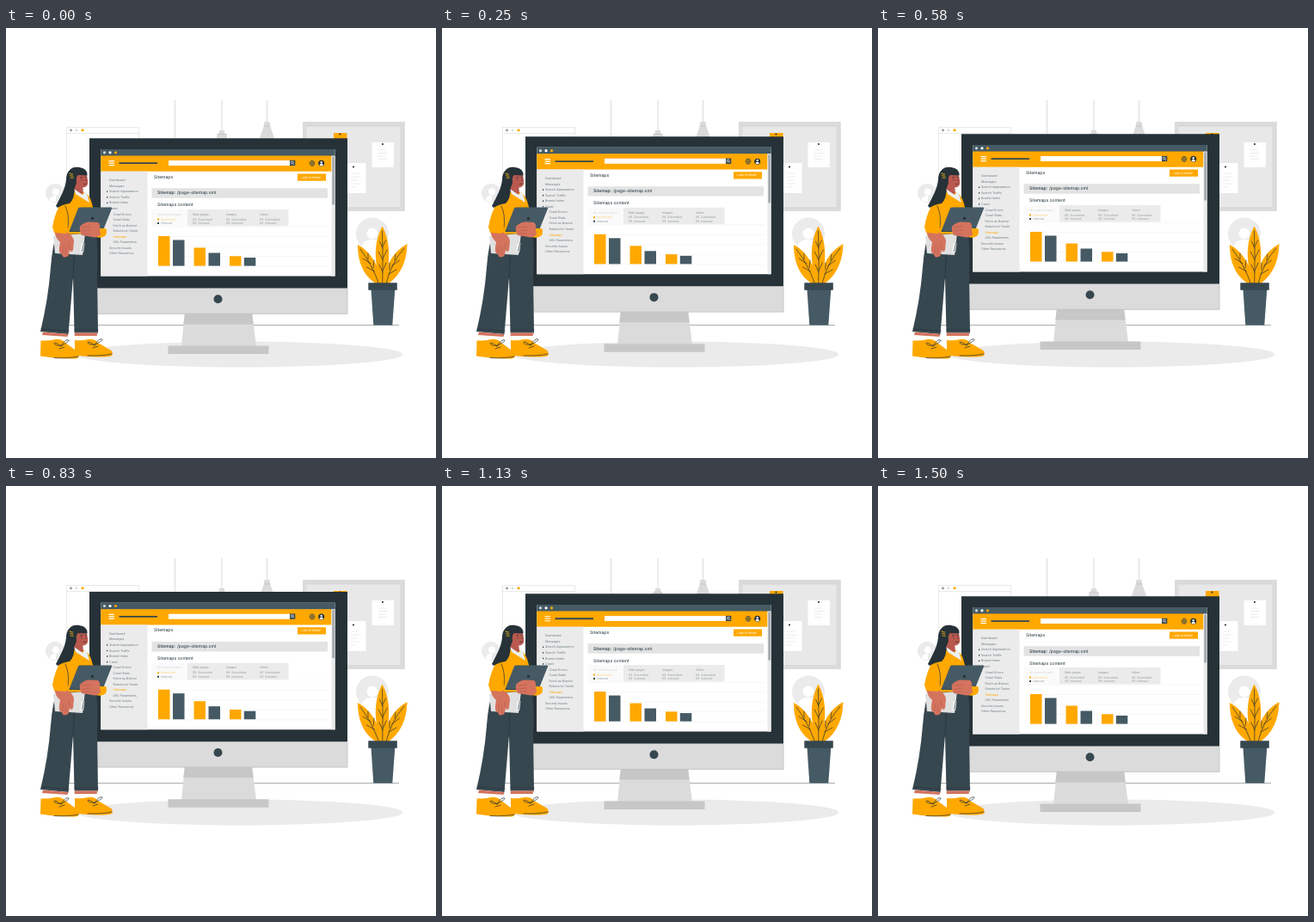
These frames come from a looping animation (500x500 px, 1.54 s). An HTML page:

```html
<!DOCTYPE html>
<html lang="en">
<head>
<meta charset="utf-8">
<title>Sitemap workspace</title>
<style>
html, body { margin: 0; width: 100%; height: 100%; overflow: hidden; background: #fff; }
svg { display: block; width: 100vw; height: 100vh; }
text { font-family: Inter, sans-serif; text-rendering: geometricPrecision; white-space: pre; }
.vein { fill: none; stroke: #263238; stroke-width: .7; stroke-linecap: round; }
.finger { fill: none; stroke: #a64f44; stroke-width: .4; }
.skin { fill: #d4735e; }
.face { fill: #b9594f; }
.amber { fill: #ffa800; }
.dark { fill: #263238; }
.slate { fill: #455a64; }
.deep { fill: #37474f; }
</style>
</head>
<body>
<svg viewBox="0 0 500 500">
  <g id="wall">
    <path d="M196.500 84V135M251 84V120M303.500 84V110" stroke="#dbdbdb" fill="none"/>
    <g fill="#dbdbdb">
      <path d="M248 119h6v3l3 2v14h-12v-14l3-2z"/>
      <path d="M300.500 109h6l1 6 5 14v8h-18v-8l5-14z"/>
    </g>
    <path d="M246 123.500h10M300 114h7" stroke="#c7c7c7" fill="none"/>
    <path d="M345 109h118.500v104H345z" fill="#dbdbdb"/>
    <path d="M349.500 114h109v94h-109z" fill="#e8e8e8"/>
    <path d="M349.500 114h109M463 109v104" stroke="#cfcfcf" stroke-width=".7"/>
    <path class="amber" d="M381 122h15.500v20H381z"/>
    <path d="M425.500 133h25.500v29h-25.500zM392 157h26.500v35H392z" fill="#fff"/>
    <g class="dark"><circle cx="388.500" cy="123.500" r="1.100"/><circle cx="438" cy="135" r="1.100"/><circle cx="404" cy="161.500" r="1.100"/></g>
    <path d="M433 142h9M433 145.500h11M433 149h8M433 152.500h10M401 169h9M401 173h11M401 177h8M401 181h10M401 185h6" stroke="#e8e8e8" stroke-width=".8"/>
    <path d="M70.500 115.500H154.500V220H70.500zM70.500 122.500H154.500" fill="#fff" stroke="#e0e0e0" stroke-width=".7"/>
    <circle cx="75.500" cy="118.800" r="1.600" fill="#9ea7aa"/>
    <circle cx="82" cy="118.800" r="1.600" fill="#d5e3dc"/>
    <circle cx="89" cy="118.800" r="1.600" class="amber"/>
    <circle cx="57" cy="192" r="11" fill="#ebebeb"/>
    <circle cx="58" cy="190.500" r="4" fill="#fff"/>
    <path d="M50.500 200q1-5 7.500-5v7q-4 1-7.500-2z" fill="#fff"/>
    <circle cx="426" cy="239.500" r="19" fill="#ebebeb"/>
    <circle cx="426" cy="239" r="6.500" fill="#fff"/>
    <path d="M414 254q1-8 12-8t12 8q-12 9-24 0z" fill="#fff"/>
  </g>
  <ellipse cx="271.500" cy="379.500" rx="190" ry="15" fill="#ebebeb"/>
  <path d="M45 345.500H457" stroke="#263238" stroke-width=".4"/>

  <g id="plant">
    <path class="amber" d="M437.500 230.500C447 248 448 272 439.500 297H436C428 274 427 250 437.500 230.500z"/>
    <path class="amber" d="M409 252C424 260 434 276 437 297H430C415 288 409 271 409 252z"/>
    <path class="amber" d="M466.500 251C466 271 459 287 445 297H439.500C441 276 450 260 466.500 251z"/>
    <path class="vein" stroke-width=".8" d="M437.800 297Q438.500 265 437.500 236M433.500 297Q425 274 412 257M442 297Q448 273 463 256"/>
    <path class="vein" d="M438 284l-4-9M438.200 282l4-9M438.200 270l-5-10M438.200 268l5-10M438 256l-3.500-8M438 254l3.500-7M428.500 283l-9-5M424 274l-9-6M427 279l1-9M421 269l0-7M445 286l9-5M448.500 277l9-7M446 281l0-8M452 270l1-7"/>
    <path class="slate" d="M424.500 304h27.800l-3 41.600h-22z"/>
    <path class="deep" d="M421.300 296.300h33.500v8.500h-33.500z"/>
  </g>

  <g id="monitor">
    <path d="M208 331h78l5 39.500h-87z" fill="#dbdbdb"/>
    <path d="M208 331h78l1.700 13.500h-81.500z" fill="#c7c7c7"/>
    <path d="M188.500 369.500h117v9.500h-117z" fill="#c7c7c7"/>
    <path d="M97 300h300v32.500H97z" fill="#dbdbdb"/>
    <path d="M97 332.300H397V303" fill="none" stroke="#b5babc" stroke-width=".7"/>
    <path class="dark" d="M97 128.300h300v174.200H97z"/>
    <circle class="deep" cx="246.500" cy="315.300" r="5"/>
    <path d="M110.300 141h272.300v147.500H110.300z" fill="#fff"/>
    <path class="slate" d="M110.300 141h272.300v8H110.300z"/>
    <circle cx="114.500" cy="144.800" r="1.600" fill="#cfd8dc"/>
    <circle cx="121" cy="144.800" r="1.600" fill="#fff"/>
    <circle cx="127.500" cy="144.800" r="1.600" class="amber"/>
    <path class="amber" d="M110.300 148.500h268.200v18.200H110.300z"/>
    <path d="M378.500 148.500h4.100v140h-4.100z" fill="#ebebeb"/>
    <path d="M379.200 149.500h2.900v56h-2.900z" fill="#a5acb0"/>
    <g id="toolbar" transform="translate(0 -.5)">
      <path d="M119.500 155.200h6.500M119.500 157.700h6.500M119.500 160.200h6.500" stroke="#fff" stroke-width="1.200"/>
      <path d="M131.500 157.700h44.500" stroke="#37474f" stroke-width="1.800"/>
      <path d="M189 154.500h141v6h-141z" fill="#fff"/>
      <path class="deep" d="M330 154.300h6.300v6.300h-6.300z"/>
      <path d="M334.800 159.200l-1-1" stroke="#fff" stroke-width=".8"/>
      <circle cx="332.800" cy="157" r="1.400" fill="none" stroke="#fff" stroke-width=".7"/>
      <g fill="none" stroke="#37474f" stroke-width=".6">
        <circle cx="356" cy="157.800" r="3"/><ellipse cx="356" cy="157.800" rx="1.400" ry="3"/>
        <path d="M353 157.800h6M356 154.800v6"/>
      </g>
      <circle class="dark" cx="366.700" cy="157.800" r="3.500"/>
      <circle cx="366.700" cy="156.700" r="1.200" fill="#fff"/>
      <path d="M364.500 160.200q0-1.900 2.200-1.900t2.200 1.900q-2.200 1.500-4.400 0z" fill="#fff"/>
    </g>
    <path d="M110.300 166.700h54.200V288.500H110.300z" fill="#ebebeb"/>
    <path class="amber" d="M339 169.500h33v8.200h-33z"/>
    <path d="M169.500 186.300H374V197.700H169.500z" fill="#e3e3e3"/>
    <path d="M169.500 211H211v19.500h-41.500z" fill="#fafafa"/>
    <path d="M211 211h117.500v19.500H211z" fill="#ebebeb"/>
    <path d="M170 231h206M176 242.500h200M176 254h200M176 265.500h200M176 277h200" stroke="#f1f1f1" stroke-width=".6"/>
    <path class="amber" d="M176 221.500h2v2h-2z"/>
    <path class="deep" d="M176 226h2v2h-2z"/>
    <g id="bars"></g>
    <g id="labels"></g>
  </g>

  <g id="woman">
    <path class="deep" d="M60 236L104 235Q107.500 255 106 285L107 354.500H79.500L78 290L72.500 356L40 353Q49 316 52 278Q54 252 60 236z"/>
    <path class="vein" d="M79 262Q79 278 78 292M41 350L73 352.500M80 351H107" stroke-width=".4"/>
    <path class="skin" d="M43 353.500L72.500 356L71.500 359L42 357zM80 354.500H106.500L105.500 358H79.500z"/>
    <path class="amber" d="M40.500 363.500Q50 364 57 362Q64 361 69 366L84 377Q87 384 81 384.500Q60 385 40 381.500z"/>
    <path class="amber" d="M80 363Q88 364 95 362Q103 361 107 366L122.500 375Q126 381 120 382Q100 383.500 80 380.500z"/>
    <path class="vein" d="M64 370q-8-6-8-3q2 3 9 2q9-5 8-6q-4-2-9 7M103 369q-8-6-8-3q2 3 9 2q9-5 8-6q-4-2-9 7"/>
    <path class="vein" d="M62 373l6-2M101 372l6-2M56 383.500Q72 384.500 84 382M95 381Q112 381.500 123 379" stroke-width=".4"/>
    <path class="amber" d="M77 190Q69 191 66 199Q56 216 54 232L62 240L104 239Q104 216 99 201Q97 194 91 191z"/>
    <path class="face" d="M78 180L79 190Q85 196 90 192L89 183z"/>
    <path d="M79 187L89 194L93 189L97 203L81 193z" fill="#eceff1"/>
    <path class="face" d="M81 168L93.500 169L95 177Q96 185 90 185.500Q83 186 80 179z"/>
    <path class="dark" d="M85 162C76 160 70 167 70 176C69 187 64 195 58 207L60 209Q66 205 74 204Q80 198 79.500 187L82 180Q81 173 84 171L94.500 171.500Q95 163 85 162z"/>
    <path class="vein" d="M86.500 174l2.200-.6M92 173.300l1.800.3M88 176v1M93 176v1M90.500 181.500l2.500-.3" stroke-width=".6"/>
    <path d="M73.500 169l4.500 1.300M74 171.500l4.500 1M74.500 174l4 .5" stroke="#c99a1c" stroke-width="1.100"/>
    <path class="vein" d="M69 207Q74 218 72 232" stroke-width=".4"/>
    <path d="M55 242L92 239L89 264L57 262z" fill="#e0e0e0"/>
    <path d="M87.500 250h4l-1.500 11h-3.500z" fill="#f5f5f5"/>
    <path d="M90.500 250l-2 10" stroke="#455a64" stroke-width=".8"/>
    <path class="skin" d="M56 235L70 237Q79 242 79 248L78 258Q76 262 74 258Q73 267 70 266Q66 268 65 263Q61 262 62 255L63 249Q57 244 56 235z"/>
    <path class="finger" d="M74 258l-1-8M69.500 264v-10M65.500 262l1-9"/>
    <path class="amber" d="M54 231L58 226L72 229L70 239L56 238z"/>
    <path class="slate" d="M84 209.500Q85 208.500 86 208.500H122Q124 208.500 123 210L113 235Q112 237 110 237H75Q73 237 74 235z"/>
    <path class="deep" d="M74 235Q73 237 75 237H110L109 236H77z"/>
    <circle cx="100.500" cy="221.500" r="1.700" class="dark"/>
    <path class="amber" d="M102 237L109 233H116Q118 236 116 241Q112 245 104 243z"/>
    <path class="skin" d="M86 231Q91 225 98 225.500L107 226Q110 228 109 234L110 240Q106 244.500 100 243L88 241Q85 236 86 231z"/>
    <path class="finger" d="M88 232L99 231M88 236L99 235M89 239L98 239"/>
  </g>
</svg>
<script>
const NS = "http://www.w3.org/2000/svg";
const byId = id => document.getElementById(id);
const labels = byId("labels"), bars = byId("bars"), monitor = byId("monitor");

function add(parent, tag, attrs, content = "") {
  const el = document.createElementNS(NS, tag);
  for (const key in attrs) el.setAttribute(key, attrs[key]);
  el.textContent = content;
  return parent.appendChild(el);
}
// y is the vertical middle of the lower-case letters
function label(content, x, y, size, fill, weight = 400) {
  add(labels, "text", { x, y: y + size * .3, "font-size": size, "font-weight": weight, fill }, content);
}

const menu = ["Dashboard", "Messages", "Search Appearance", "Search Traffic", "Bramol Index", "Crawl",
  "Crawl Errors", "Crawl Stats", "Fetch as Bramol", "Robots.txt Tester", "Sitemaps", "URL Parameters",
  "Security Issues", "Other Resources"];
menu.forEach((name, i) => {
  const y = 177.2 + i * 6.54, nested = i > 5 && i < 12;
  label(name, nested ? 124.5 : 120, y, 3.6, name === "Sitemaps" ? "#ffa800" : "#6b7a82");
  if (i > 1 && i < 6) add(labels, "path", { d: `M117 ${y - 1.1}l1.6 1.1-1.6 1.1z`, class: "dark" });
});

label("Sitemaps", 172, 173.3, 5, "#37474f", 500);
label("+ ADD SITEMAP", 342, 173.7, 3.1, "#fff", 500);
label("Sitemap:", 176, 192, 5, "#37474f", 600);
label("/page-sitemap.xml", 199, 192, 5, "#37474f", 500);
label("Sitemaps content", 176, 206, 5, "#37474f", 500);
label("All content types", 176, 216.7, 3.5, "#d0d3d5");
label("Submitted", 180, 222.5, 3.5, "#ffd07a");
label("Indexed", 180, 227, 3.5, "#9aa3a7");
["Web pages", "Images", "Video"].forEach((name, i) => {
  const x = 217 + i * 39;
  label(name, x, 216.7, 3.5, "#8b9498");
  label("98  Submitted", x, 222.5, 3.5, "#959da1");
  label("98  Indexed", x, 227, 3.5, "#959da1");
});

[[177, 242], [194, 246.5], [218.5, 255.5], [235.5, 261.5], [260, 265.3], [276.8, 267]].forEach(([x, y], i) =>
  add(bars, "rect", { x, y, width: 13.5, height: 276.6 - y, class: i % 2 ? "slate" : "amber" }));

const LOOP = 1540, PEAK = 720, END = 1500, LIFT = 6.2;
function render(ms) {
  const t = ms % LOOP;
  const k = t < PEAK ? t / PEAK : Math.max(0, (END - t) / (END - PEAK));
  monitor.setAttribute("transform", `translate(0 ${(-LIFT * k).toFixed(3)})`);
}
const start = performance.now();
function tick() {
  render(performance.now() - start);
  requestAnimationFrame(tick);
}
render(0);
tick();
</script>
</body>
</html>
```
